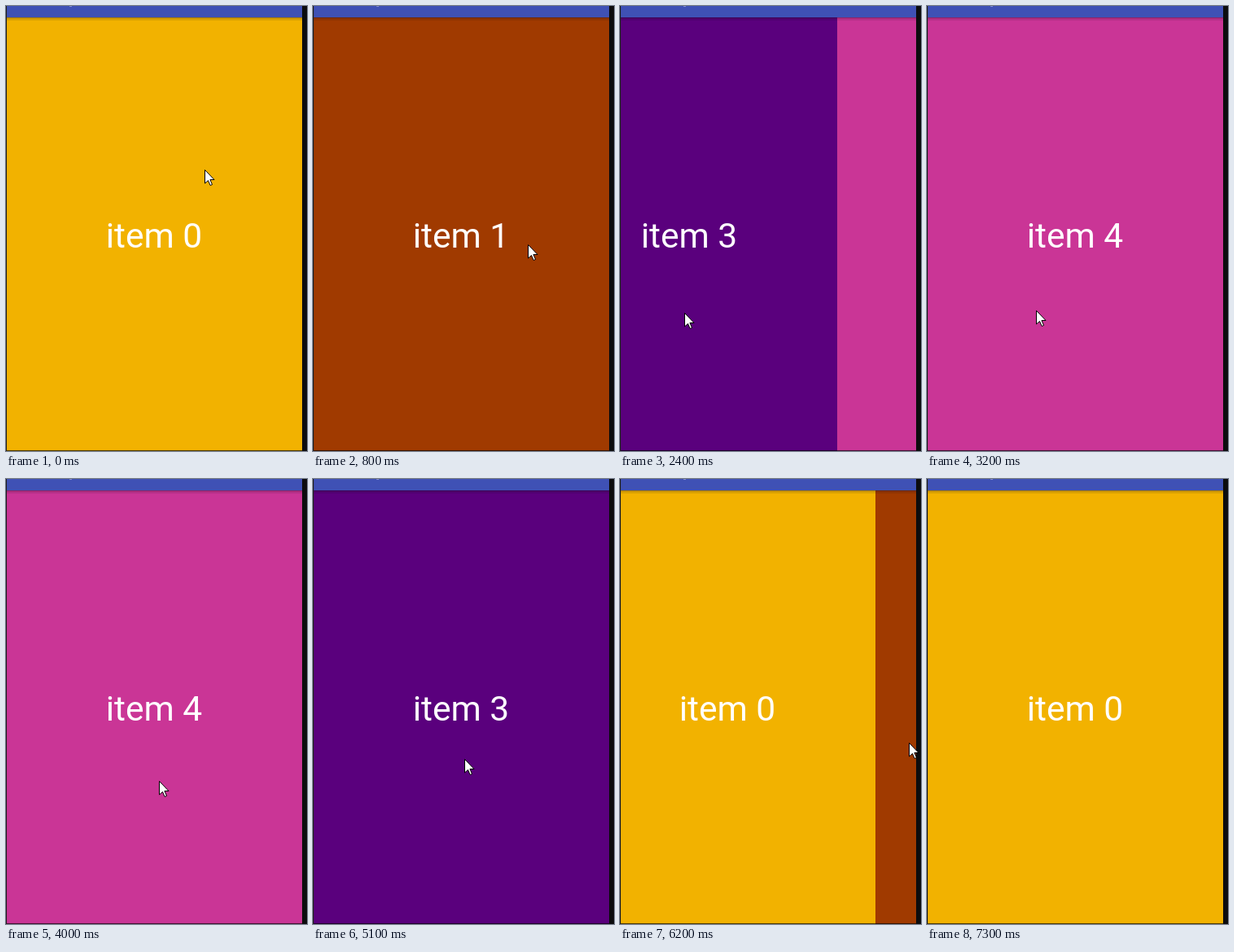
An HTML page with a canvas that plays this animation: 370 by 547 pixels, repeating every 7.9 s.

```html
<!DOCTYPE html>
<html lang="en">
<head>
<meta charset="utf-8">
<title>Swipe pager</title>
<style>
  html, body { margin: 0; width: 370px; height: 547px; overflow: hidden; background: #111; }
  canvas { display: block; }
</style>
</head>
<body>
<canvas id="stage" width="370" height="547"></canvas>
<script>
const ctx = document.getElementById('stage').getContext('2d');
const LOOP = 7900, STEP = 100, END = 7300;
const WIDTH = 363, TOP = 14, BOTTOM = 547;
const SWING = 80, RIGHT_LIMIT = 355;
const colors = ['#f2b200', '#a03a00', '#16b125', '#5a007d', '#ca3596'];
const arrow = new Path2D('M0 0V16.5L4 13L6.6 19L9 18L6.4 12H11.5Z');

// Pointer stops; between two stops it also sways sideways, first right if swings > 0
const stops = [
  { time: 0, x: 244, y: 201, swings: 2 },
  { time: 1500, x: 221, y: 373, swings: -1 },
  { time: 2400, x: 79, y: 377, swings: -2 },
  { time: 4000, x: 188, y: 371, swings: -1 },
  { time: 5100, x: 186, y: 344, swings: 2 },
  { time: 6200, x: 355, y: 324, swings: -1 },
  { time: 7000, x: 310, y: 350, swings: 0 },
  { time: END, x: 250, y: 560 }
];

const lerp = (a, b, u) => a + (b - a) * u;

function ease(u) {
  u = Math.min(1, Math.max(0, u));
  return u * u * (3 - 2 * u);
}

// Four swipes forward, then four quicker ones back
function pageAt(time) {
  let page = 0;
  for (let k = 0; k < 4; k++) {
    page += ease((time - 130 - 700 * k) / 500);
    page -= ease((time - 4684 - 416 * k) / 350);
  }
  return page;
}

function pointerAt(time) {
  const i = Math.max(1, stops.findIndex(stop => stop.time >= time));
  const a = stops[i - 1], b = stops[i];
  const u = (time - a.time) / (b.time - a.time);
  const sway = SWING * Math.sin(2 * Math.PI * a.swings * u);
  return [Math.min(RIGHT_LIMIT, lerp(a.x, b.x, u) + sway), lerp(a.y, b.y, u)];
}

function rect(color, x, y, w, h) {
  ctx.fillStyle = color;
  ctx.fillRect(x, y, w, h);
}

function drawPages(page) {
  ctx.save();
  ctx.beginPath();
  ctx.rect(1, TOP, WIDTH, BOTTOM - TOP);
  ctx.clip();
  ctx.font = '42.5px Roboto, sans-serif';
  ctx.textAlign = 'center';
  colors.forEach((color, i) => {
    const x = 1 + Math.round((i - page) * WIDTH);
    rect(color, x, TOP, WIDTH, BOTTOM - TOP);
    ctx.fillStyle = '#fff';
    ctx.fillText('item ' + i, x + 181, 297);
  });
  ctx.restore();
}

function drawFrame() {
  rect('#3f51b5', 1, 0, WIDTH, TOP);
  rect('rgba(255,255,255,.35)', 78, 0, 3, 1);
  for (let i = 0; i < 4; i++) rect(`rgba(0,0,0,${0.3 / (1 + i)})`, 1, TOP + i, WIDTH, 1);
  rect('rgba(0,0,0,.65)', 1, BOTTOM - 1, WIDTH, 1);
}

function drawPointer(x, y) {
  ctx.save();
  ctx.translate(Math.round(x) + 0.5, Math.round(y) + 0.5);
  ctx.fillStyle = '#fff';
  ctx.fill(arrow);
  ctx.strokeStyle = '#000';
  ctx.stroke(arrow);
  ctx.restore();
}

function draw(now) {
  const time = Math.min(END, Math.floor((now % LOOP) / STEP) * STEP);
  rect('#1c1c1c', 0, 0, 370, BOTTOM);
  rect('#0c0c0e', 364, 0, 6, BOTTOM);
  drawPages(pageAt(time));
  drawFrame();
  drawPointer(...pointerAt(time));
  requestAnimationFrame(draw);
}
draw(0);
</script>
</body>
</html>
```
